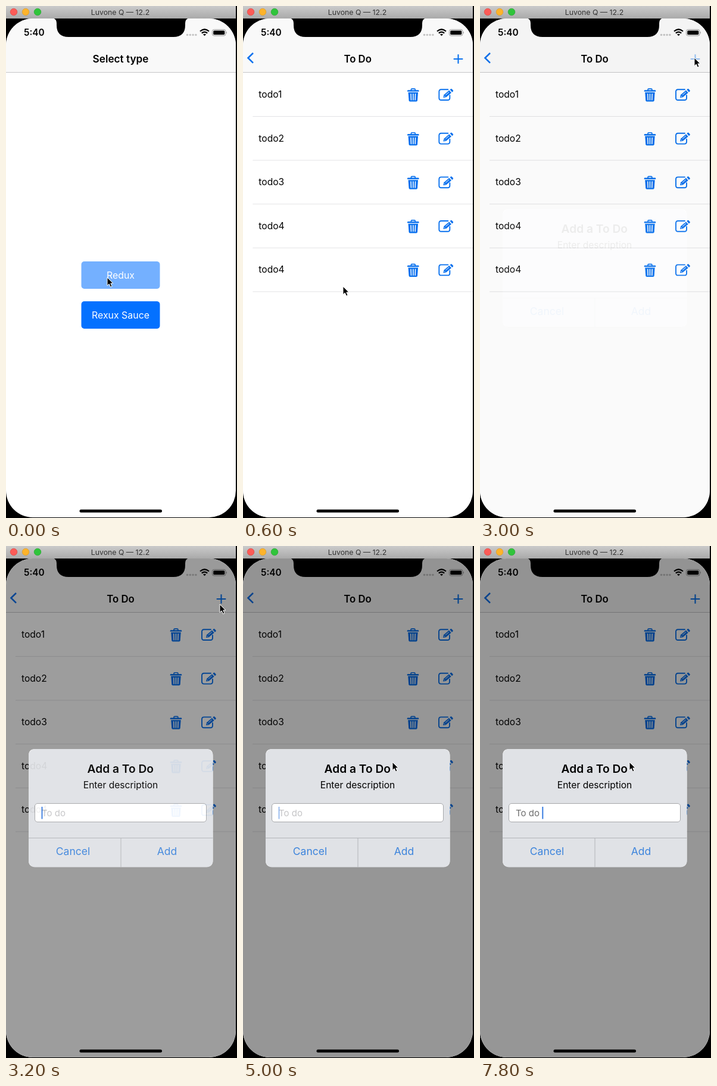
These frames come from a looping animation (388x860 px, 8000 ms). An HTML page:

```html
<!DOCTYPE html>
<html lang="en">
<head>
<meta charset="utf-8">
<title>To Do demo</title>
<style>
  html, body { margin: 0; width: 100%; height: 100%; overflow: hidden; background: #000; }
  svg { display: block; width: 100%; height: 100%; }
  text { font-family: Inter, "Open Sans", sans-serif; white-space: pre; }
  .mid { text-anchor: middle; }
  .bold { font-weight: 600; }
</style>
</head>
<body>
<svg viewBox="0 0 388 860">
  <defs>
    <linearGradient id="bar" x2="0" y2="1">
      <stop stop-color="#cacaca"/><stop offset="1" stop-color="#aaa"/>
    </linearGradient>
    <clipPath id="screen"><rect y="21" width="386" height="838" rx="45"/></clipPath>
    <g id="trash" fill="#0971ee">
      <path d="M5.500 3V2Q5.500 0 7.500 0H12Q14 0 14 2V3H18.500Q19.500 3 19.500 4V5.500H0V4Q0 3 1 3ZM7.300 3H12.200V1.700H7.300Z" fill-rule="evenodd"/>
      <path d="M1.500 6.700H18L17 20.300Q16.800 22.300 15 22.300H4.500Q2.700 22.300 2.500 20.300Z"/>
      <path d="M6 9.500L6.400 19.500M9.750 9.500V19.500M13.500 9.500L13.100 19.500" stroke="#fff" stroke-width="1.500" stroke-linecap="round"/>
    </g>
    <g id="edit" fill="none" stroke="#0971ee" stroke-width="1.900">
      <path d="M16 2.200H4.500Q1 2.200 1 5.700V16.500Q1 20 4.500 20H15.500Q19 20 19 16.500V12" stroke-linecap="round"/>
      <path d="M8 16L9 11.300L18 3.600L21.700 7.700L12.800 15.200Z" fill="#0971ee" stroke="none"/>
      <path d="M19.300 2.500L20.700 1.300Q21.700 .5 22.600 1.500L24.600 3.700Q25.300 4.600 24.300 5.500L22.900 6.700Z" fill="#0971ee" stroke="none"/>
      <path d="M12 11.500L17.800 6.500M9.800 13L11.200 14.600" stroke="#fff" stroke-width="1"/>
    </g>
  </defs>

  <rect width="388" height="860"/>
  <rect width="386" height="21" fill="url(#bar)"/>
  <g stroke-width=".7">
    <circle cx="13" cy="10" r="5.800" fill="#fc5b57" stroke="#dc4640"/>
    <circle cx="33" cy="10" r="5.800" fill="#fdb32b" stroke="#d99a27"/>
    <circle cx="53" cy="10" r="5.800" fill="#30c43b" stroke="#25a52f"/>
  </g>
  <text class="mid" x="192" y="15" font-size="12.300" fill="#333">Luvone Q — 12.2</text>

  <g clip-path="url(#screen)">
    <rect y="21" width="386" height="838" fill="#fff"/>
    <g id="home" class="mid" font-size="15.900" fill="#fff">
      <g id="press">
        <rect x="126.500" y="429" width="132" height="46" rx="5" fill="#0471ff"/>
        <text x="192.500" y="458">Redux</text>
      </g>
      <rect x="126.500" y="496" width="132" height="46" rx="5" fill="#0471ff"/>
      <text x="192.500" y="525">Rexux Sauce</text>
    </g>
    <g id="list"><rect y="111" width="386" height="748" fill="#fff"/></g>

    <rect y="21" width="386" height="90" fill="#f9f9f9"/>
    <path d="M0 111.500H386" stroke="#c6c6c8"/>
    <text id="homeTitle" class="mid bold" y="95" font-size="17.200">Select type</text>
    <g id="nav">
      <text id="listTitle" class="mid bold" y="95" font-size="16.800">To Do</text>
      <path d="M17 79L8.500 87.300L17 95.600" fill="none" stroke="#0971ee" stroke-width="2.600"/>
      <path id="plus" d="M353.700 89H369.300M361.500 81.200V96.800" stroke="#0971ee" stroke-width="2.100"/>
    </g>

    <text class="bold" x="30" y="50" font-size="15.400">5:40</text>
    <g fill="#c5c5c5">
      <circle cx="304.500" cy="48.500" r="1.800"/><circle cx="309.300" cy="48.500" r="1.800"/>
      <circle cx="314.100" cy="48.500" r="1.800"/><circle cx="318.900" cy="48.500" r="1.800"/>
    </g>
    <g fill="none" stroke="#000" stroke-width="2.200">
      <path d="M326 42.500Q333.500 36 341 42.500M328.800 45.700Q333.500 41.700 338.200 45.700"/>
      <path d="M331 47.700Q333.500 45.700 336 47.700L333.500 50.300Z" fill="#000" stroke="none"/>
    </g>
    <rect x="346.500" y="39.500" width="22.500" height="10.500" rx="3" fill="none" stroke="#999"/>
    <rect x="348.200" y="41.200" width="19.100" height="7.100" rx="1.600"/>
    <path d="M370 43Q372 44.700 370 46.500Z" fill="#999"/>

    <path id="dim" fill-rule="evenodd" d="M0 21H386V859H0ZM49 341H336.500Q347.500 341 347.500 352V528Q347.500 539 336.500 539H49Q38 539 38 528V352Q38 341 49 341Z"/>
    <path d="M77 20Q85 21 85 29V32Q85 52 105 52H281Q301 52 301 32V29Q301 21 309 20Z"/>
    <rect x="123.500" y="845.700" width="138.500" height="5" rx="2.500"/>

    <g id="alert">
      <rect x="38" y="341" width="309.500" height="198.500" rx="11" fill="#e0e2e6"/>
      <text class="mid bold" x="192.300" y="381" font-size="19.200">Add a To Do</text>
      <text class="mid" x="192.500" y="407" font-size="15.600">Enter description</text>
      <g id="field">
        <rect x="48.500" y="432.500" width="288" height="31" rx="4.500" fill="#fff" stroke="#a6a7aa"/>
        <text id="entry" x="60" y="454" font-size="15"></text>
        <rect id="caret" y="438" width="2" height="20.500" fill="#3b7de0"/>
      </g>
      <path d="M38 490.500H347.500M193 490.500V539.500" stroke="#b2b4b8"/>
      <g class="mid" font-size="17.500" fill="#3c84dc">
        <text x="112.500" y="519">Cancel</text><text x="270.500" y="519">Add</text>
      </g>
    </g>
  </g>
  <path id="cursor" d="M0 0V13.700L3.200 10.800L5.500 16L8 15L5.800 9.900H10Z" stroke="#fff" stroke-width="1"/>
</svg>

<script>
const LOOP = 8000, STEP = 200;
const el = id => document.getElementById(id);
const set = (id, attrs) => {
  for (const k in attrs) el(id).setAttribute(k, attrs[k]);
};

const rows = ["todo1", "todo2", "todo3", "todo4", "todo4"];
el("list").innerHTML += rows.map((label, i) => `
  <g transform="translate(0 ${i * 73.6})">
    <text x="26" y="154" font-size="15.600">${label}</text>
    <use href="#trash" x="275.700" y="138.300"/>
    <use href="#edit" x="328" y="138"/>
    <path d="M16 185.500H386" stroke="#e3e3e5"/>
  </g>`).join("");

// Interpolates linearly between [time, value] points.
function track(points, t) {
  const i = points.findIndex(p => p[0] > t);
  if (i < 0) return points[points.length - 1][1];
  if (i === 0) return points[0][1];
  const [t0, a] = points[i - 1], [t1, b] = points[i];
  return a + (b - a) * (t - t0) / (t1 - t0);
}

const pointer = [
  [0, 170, 456], [400, 168, 471], [800, 168, 471], [1200, 274, 285],
  [1400, 357, 193], [1800, 361, 110], [2200, 361, 86], [3000, 360, 87],
  [3200, 359, 98], [3600, 352, 140], [4400, 285, 310], [4800, 251, 363]
];
const pointerX = pointer.map(p => [p[0], p[1]]);
const pointerY = pointer.map(p => [p[0], p[2]]);
const typed = "To do ";
const keys = [5600, 5800, 6400, 6600, 6800, 7400];
const caretX = [59.5, 69, 78, 82, 91.2, 100.7, 104.3];

// Screen push: cubic-bezier(.2833, .99, .3183, .99), returns what is left to travel.
function pushLeft(t) {
  const x = Math.min(1, Math.max(0, (t - 190) / 500));
  let lo = 0, hi = 1;
  for (let i = 0; i < 20; i++) {
    const s = (lo + hi) / 2, r = 1 - s;
    if (3 * r * r * s * .2833 + 3 * r * s * s * .3183 + s ** 3 < x) lo = s;
    else hi = s;
  }
  return (1 - lo) ** 3;
}

function caretOpacity(t) {
  if (t >= keys[0]) return 1;
  return track([[0, 1], [400, 1], [550, 0], [700, 0], [900, 1]], (t - 3200) % 1000);
}

function draw(t) {
  const left = t < STEP ? 1 : pushLeft(t);
  set("home", { transform: `translate(${-115 * (1 - left)} 0)` });
  set("list", { transform: `translate(${386 * left} 0)` });
  set("press", { opacity: track([[0, .55], [400, 1]], t) });
  set("homeTitle", { x: 192.5 - 115 * (1 - left), opacity: Math.max(0, left * 2 - 1) });
  set("listTitle", { x: 192.5 + 193 * left });
  set("nav", { opacity: 1 - left });
  set("plus", { opacity: track([[2400, 1], [2600, .3], [2800, .3], [3000, .4], [3200, 1]], t) });

  const shown = track([[2800, 0], [3000, .07], [3200, .94], [3400, 1]], t);
  set("dim", { "fill-opacity": track([[2800, 0], [3000, .02], [3200, .385], [3400, .41]], t) });
  set("alert", { opacity: shown });
  set("field", { opacity: shown > .5 ? 1 : 0 });

  const count = keys.filter(k => k <= t).length;
  el("entry").textContent = count ? typed.slice(0, count) : "To do";
  set("entry", { fill: count ? "#6c6c6c" : "#c4c4c6" });
  set("caret", { x: caretX[count], opacity: caretOpacity(t) });
  set("cursor", { transform: `translate(${track(pointerX, t)} ${track(pointerY, t)})` });
}

const start = performance.now();
function tick() {
  const t = (performance.now() - start) % LOOP;
  draw(Math.floor(t / STEP) * STEP);
  requestAnimationFrame(tick);
}
tick();
</script>
</body>
</html>
```
